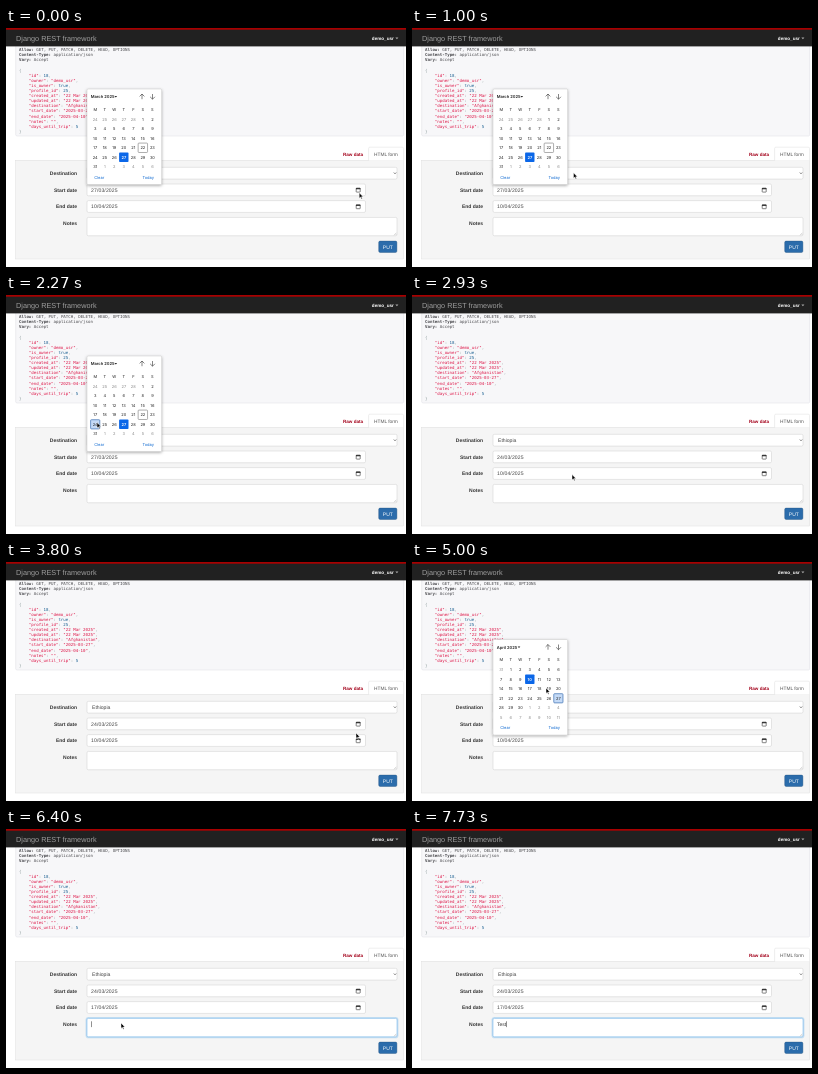
Write an HTML page that moves like this. It is 400x239 px and loops after 8 s.

```html
<!DOCTYPE html>
<html lang="en">
<head>
<meta charset="utf-8">
<title>Django REST framework</title>
<style>
  html, body { margin: 0; width: 100%; height: 100%; overflow: hidden; background: #fff; }
  svg { display: block; width: 100vw; height: 100vh; }
  text { font: 5px "Liberation Sans", Arial, sans-serif; fill: #333; text-rendering: geometricPrecision; white-space: pre; }
  .b { font-weight: bold; }
  .end { text-anchor: end; }
  .mid { text-anchor: middle; }
  .mono { font: 4.1px "DejaVu Sans Mono", monospace; fill: #48484c; }
  .str { fill: #d14; }
  .lit { fill: #195f91; }
  .pun { fill: #93a1a1; }
  .date { font-size: 5.1px; letter-spacing: .12px; fill: #444; }
  .cal text { font: 4px Inter, sans-serif; fill: #222; }
  .cal .b { font-weight: 600; }
  .cal .dim { fill: #8a8a8a; }
  .cal .sel { fill: #fff; font-weight: 600; }
  .cal .link { fill: #0b67d0; }
  .field { fill: #fff; stroke: #ccc; stroke-width: .5; }
  .line { fill: none; stroke: #333; stroke-width: .6; }
</style>
</head>
<body>
<svg id="stage" viewBox="0 0 400 239" preserveAspectRatio="none"></svg>
<script>
const FRAME = 1000 / 15, LOOP = 8000, CELL = 9.53;
const stage = document.getElementById('stage');
const $ = id => document.getElementById(id);

const text = (x, y, str, cls = '', attrs = '') => `<text x="${x}" y="${y}" class="${cls}" ${attrs}>${str}</text>`;
const rect = (x, y, w, h, attrs) => `<rect x="${x}" y="${y}" width="${w}" height="${h}" ${attrs}/>`;
const path = (d, attrs = 'class="line"') => `<path d="${d}" ${attrs}/>`;
const field = (y, w, h, id = '') => rect(81, y, w, h, `rx="1.4" class="field" id="${id}"`);
const span = (cls, str) => `<tspan class="${cls}">${str}</tspan>`;

function response() {
  const headers = [['Allow', 'GET, PUT, PATCH, DELETE, HEAD, OPTIONS'],
    ['Content-Type', 'application/json'], ['Vary', 'Accept']];
  const record = {
    id: 18, owner: 'demo_usr', is_owner: true, profile_id: 25,
    created_at: '22 Mar 2025', updated_at: '22 Mar 2025', destination: 'Afghanistan',
    start_date: '2025-03-27', end_date: '2025-04-10', notes: '', days_until_trip: 5
  };
  const lineY = row => 23.2 + row * 5.1;
  const entries = Object.entries(record);
  const out = headers.map(([key, value], i) =>
    text(13, lineY(i), span('b', key + ':') + ' ' + value, 'mono'));
  out.push(text(13, lineY(4), '{', 'mono pun'));
  entries.forEach(([key, value], i) => {
    const type = typeof value === 'string' ? 'str' : 'lit';
    const comma = i < entries.length - 1 ? ',' : '';
    out.push(text(22.8, lineY(5 + i), span('str', `"${key}"`) + span('pun', ': ') +
      span(type, JSON.stringify(value)) + span('pun', comma), 'mono'));
  });
  out.push(text(13, lineY(16), '}', 'mono pun'));
  return out.join('');
}

const dateIcon = y =>
  rect(350.2, y - 1.9, 4, 4, 'rx=".4" class="line"') + path(`M350 ${y - 1.3}h4.4`, 'stroke="#222" stroke-width="1.1"');

function page() {
  return rect(0, 0, 400, 239, 'fill="#fff"') +
    rect(9.7, 10, 388, 98, 'rx="1.4" fill="#f7f7f9" stroke="#dcdce3" stroke-width=".5"') + response() +
    rect(0, 0, 400, 18.4, 'fill="#212121"') + rect(0, 0, 400, 1.7, 'fill="#a80000"') +
    text(10, 12.8, 'Django REST framework', '', 'style="font-size:7.3px;fill:#9d9d9d"') +
    text(387.8, 12, 'demo_usr', 'b end', 'style="font-size:4.6px;fill:#fff"') +
    path('M389.4 9.6h3l-1.5 1.6z', 'fill="#aaa"') +
    rect(9.7, 132.3, 388, 98.7, 'fill="#f5f5f5" stroke="#ddd" stroke-width=".5"') +
    path('M362.6 132.6V120.5q0-1.3 1.3-1.3h32.4q1.3 0 1.3 1.3v12.1', 'fill="#fff" stroke="#ddd" stroke-width=".5"') +
    text(337, 127.7, 'Raw data', 'b', 'style="font-size:4.6px;fill:#a3001a"') +
    text(368, 127.7, 'HTML form', '', 'style="font-size:4.8px;fill:#555"') +
    [['Destination', 147], ['Start date', 163.6], ['End date', 180.2], ['Notes', 196.9]]
      .map(([label, y]) => text(71, y, label, 'b end')).join('') +
    field(139.3, 310, 11.8) + text(86, 147, 'Ethiopia', '', 'style="font-size:5.1px;fill:#444"') +
    path('M387.8 144.5l1.2 1.3l1.2-1.3') +
    field(156, 278.5, 11.8) + text(85, 163.7, '', 'date', 'id="start"') + dateIcon(162) +
    field(172.6, 278.5, 11.8) + text(85, 180.3, '', 'date', 'id="end"') + dateIcon(178.6) +
    rect(80.4, 188.8, 311.2, 19.6, 'rx="2" fill="none" stroke="#66afe9" stroke-opacity=".35" stroke-width="1.6" id="glow"') +
    field(189.4, 310, 18.4, 'notes') + path('M388 207.2l2.4-2.4M389.4 207.2l1-1', 'stroke="#999" stroke-width=".4"') +
    text(85, 197, '', '', 'id="typed"') + rect(85, 192.3, .5, 5.8, 'fill="#222" id="caret"') +
    rect(372.7, 213.1, 18.2, 11.4, 'rx="1.4" fill="#2b6cab" stroke="#245580" stroke-width=".4"') +
    text(381.8, 220.6, 'PUT', 'mid', 'style="fill:#fff"');
}

function calendar(id, top, title, firstDay, month, picked, today) {
  const colX = i => 89.2 + i * CELL, rowY = i => top + 30.2 + i * CELL;
  const box = (col, row, attrs) => rect(colX(col) - 4.7, rowY(row) - 4.7, 9.4, 9.4, attrs);
  let cells = '', marks = '';
  for (let i = 0; i < 42; i++) {
    const date = new Date(2025, firstDay[0], firstDay[1] + i), day = date.getDate();
    const col = i % 7, row = Math.floor(i / 7), inside = date.getMonth() === month;
    const isPicked = inside && day === picked;
    if (isPicked) marks += box(col, row, 'rx=".8" fill="#0b67e8"');
    if (inside && day === today) marks += box(col, row, 'rx=".8" fill="none" stroke="#777" stroke-width=".6"');
    cells += text(colX(col), rowY(row) + 1.4, day, 'mid ' + (isPicked ? 'sel' : inside ? '' : 'dim'));
  }
  const titleEnd = month === 2 ? 109.8 : 107;
  return `<g id="${id}" class="cal">` +
    rect(81, top, 74.6, 95.5, 'rx="1" fill="#fff" stroke="#bbb" stroke-width=".4" filter="url(#shadow)"') +
    text(84.7, top + 9, title, 'b', 'style="font-size:4.1px"') +
    path(`M${titleEnd - 1.3} ${top + 6.9}h2.6l-1.3 1.6z`, 'fill="#222"') +
    path(`M136 ${top + 10.2}v-5.2m-2.4 2.4l2.4-2.4l2.4 2.4M146.5 ${top + 5}v5.2m-2.4-2.4l2.4 2.4l2.4-2.4`) +
    [...'MTWTFSS'].map((d, i) => text(colX(i), top + 21.6, d, 'mid')).join('') +
    rect(0, 0, 9.2, 9.2, `id="${id}Hover" rx=".8" fill="#c4daf6" stroke="#3d70b2" stroke-width=".7"`) +
    marks + cells +
    text(88.2, top + 89.5, 'Clear', 'link') + text(148, top + 89.5, 'Today', 'link end') + '</g>';
}

const pickers = [
  { id: 'march', top: 61, from: 0, to: 40, picked: 24 },
  { id: 'april', top: 77.5, from: 62, to: 84, picked: 10 }
];

stage.innerHTML =
  '<defs><filter id="shadow" x="-20%" y="-20%" width="140%" height="140%">' +
  '<feDropShadow dx="0" dy="1" stdDeviation="1.6" flood-opacity=".35"/></filter></defs>' + page() +
  calendar('march', 61, 'March 2025', [1, 24], 2, 27, 22) +
  calendar('april', 77.5, 'April 2025', [2, 31], 3, 10) +
  path('M0 0V5.4L1.3 4.3L2.2 6.3L3.1 5.9L2.2 4L3.9 3.9Z',
    'id="cursor" fill="#000" stroke="#fff" stroke-width=".5" stroke-linejoin="round"');

// Pointer stops: time in ticks of 1/15 s, then x and y
const stops = [
  [0, 353.2, 164.8], [6, 353.2, 164.8], [10, 171.5, 150.7], [13, 171.5, 150.7], [18, 143, 134],
  [23, 125, 125.5], [24, 124.4, 125], [26, 126, 126], [33, 91.5, 127.4], [34, 91, 127.5], [40, 91, 127.5],
  [44, 160, 179.5], [47, 201.5, 165.6], [48, 202, 165.6], [52, 319, 184], [54, 319, 184],
  [57, 350, 171], [60, 349.5, 177.5], [66, 349.5, 177.5], [71, 166.5, 138.5], [73, 166.5, 138.5],
  [74, 147, 133.5], [75, 134, 126], [79, 118.5, 126], [86, 118.5, 126], [92, 115, 194]
];

function pointerAt(tick) {
  const next = stops.findIndex(stop => stop[0] > tick);
  if (next < 0) return stops.at(-1).slice(1);
  const [t0, x0, y0] = stops[Math.max(next - 1, 0)], [t1, x1, y1] = stops[next];
  const s = Math.max(0, (tick - t0) / (t1 - t0)), eased = s * s * (3 - 2 * s);
  return [x0 + (x1 - x0) * eased, y0 + (y1 - y0) * eased];
}

const show = (id, on) => $(id).setAttribute('visibility', on ? 'inherit' : 'hidden');

function drawPicker({ id, top, from, to }, tick) {
  const open = tick >= from && tick < to;
  $(id).setAttribute('visibility', open ? 'visible' : 'hidden');
  // The highlight trails the pointer by one tick
  const [x, y] = pointerAt(tick - 1);
  const col = Math.floor((x - 84.4) / CELL), row = Math.floor((y - top - 25.4) / CELL);
  const inside = col >= 0 && col < 7 && row >= 0 && row < 6;
  show(id + 'Hover', open && inside);
  $(id + 'Hover').setAttribute('x', 84.6 + col * CELL);
  $(id + 'Hover').setAttribute('y', top + 25.6 + row * CELL);
}

function draw(now) {
  const tick = Math.floor((now % LOOP) / FRAME + .06);
  const focused = tick >= 94;
  pickers.forEach(picker => drawPicker(picker, tick));
  $('start').textContent = (tick < 40 ? '27' : '24') + '/03/2025';
  $('end').textContent = (tick < 84 ? '10' : '17') + '/04/2025';

  $('typed').textContent = 'Test'.slice(0, [106, 109, 113, 116].filter(key => tick >= key).length);
  $('caret').setAttribute('x', 85.2 + $('typed').getComputedTextLength());
  show('caret', focused);
  show('glow', focused);
  $('notes').style.stroke = focused ? '#66afe9' : '';

  $('cursor').setAttribute('transform', `translate(${pointerAt(tick)})`);
  show('cursor', tick < 104);
}

const begin = performance.now();
function loop() {
  draw(performance.now() - begin);
  requestAnimationFrame(loop);
}
loop();
</script>
</body>
</html>
```
